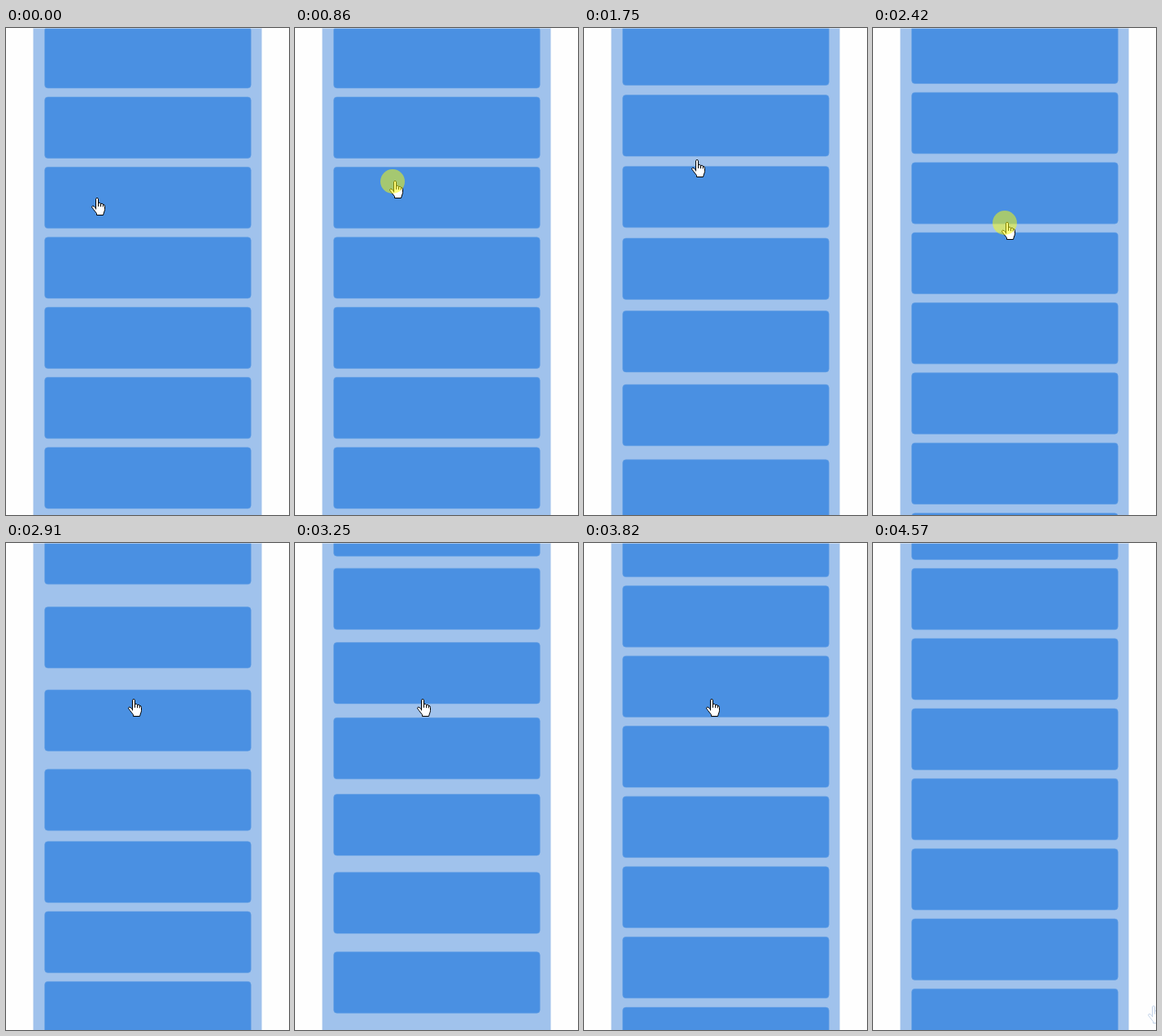
An HTML page that plays this animation: 348 by 600 pixels, repeating every 4.66 s.

```html
<!DOCTYPE html>
<html lang="en">
<head>
<meta charset="utf-8">
<title>Springy list</title>
<style>
  html, body { margin: 0; width: 100%; height: 100%; overflow: hidden; background: #fefefe; }
  svg { display: block; width: 348px; height: 600px; }
  .panel { fill: #a0c2ec; }
  .cell { fill: #4a90e2; stroke: #649fe5; stroke-width: .6; }
  .hand { fill: #fff; stroke: #000; stroke-linejoin: round; stroke-linecap: round; }
  .ghost { fill: #fff; stroke: #b3c7e2; stroke-width: .8; }
  .press { fill: #ff0; fill-opacity: .5; }
</style>
</head>
<body>
<svg viewBox="0 0 348 600">
  <defs>
    <path id="hand" d="M5.5 14V1.6Q5.5.5 7 .5T8.5 1.6V6.5Q10.6 5.4 11.5 7.5Q13.5 6.5 14.3 8.3Q16.5 8.4 16.5 10.5V14.5Q16.5 16 15.5 18L14.5 21.5H6.5V19.5L2.5 14.5Q.5 12 .5 11Q1.5 9.4 3.2 10.8L5.5 13M8.5 6.5V10.5M11.5 7.5V10.8M14.3 8.3V11"/>
  </defs>
  <rect class="panel" x="33.5" width="281" height="600"/>
  <g id="cells"></g>
  <rect x="33.5" width="281" height="1" fill="#fff" opacity=".5"/>
  <use id="ghost" class="ghost" href="#hand" x="338" y="570"/>
  <g id="cursor">
    <use class="hand" href="#hand"/>
    <circle id="press" class="press" cx="4" cy="1" r="15"/>
  </g>
</svg>
<script>
const LOOP = 4660, PITCH = 86.33, COUNT = 12, HOLD = 130;
const $ = id => document.getElementById(id);

const progress = (t, from, to) => Math.min(1, Math.max(0, (t - from) / (to - from)));
const easeInOut = u => u * u * (3 - 2 * u);
const easeOut = u => u * (2 - u);

// Critically damped step response
const spring = x => x <= 0 ? 0 : 1 - (1 + x) * Math.exp(-x);

// A flick runs down the list: each cell springs off `lag` ms after the one above
const flick = (t, i, { start, lag, stiffness, distance }) =>
  distance * spring(stiffness * ((t - start) / lag - i));

const first = { start: 996, lag: 58, stiffness: .47, distance: 92 };
const second = { start: 2706, lag: 36.5, stiffness: .33, distance: 140 };
const glide = t => 167 * easeOut(progress(t, 2535, 4530));

const cellY = (i, t) =>
  PITCH * i - 1.3 - flick(t, i, first) - flick(t, i, second) - glide(t);

const moves = [
  { from: 230, to: 520, x: 115, y: 226 },
  { from: 600, to: 1240, x: 118, y: 122, drag: true },
  { from: 1400, to: 2300, x: 158, y: 239 },
  { from: 2470, to: 2800, x: 150, y: 192, drag: true },
  { from: 3840, to: 4060, x: 352, y: 592 },
];

function cursorAt(t) {
  let x = 105, y = 209, pressed = false;
  for (const m of moves) {
    const u = easeInOut(progress(t, m.from, m.to));
    x += (m.x - x) * u;
    y += (m.y - y) * u;
    if (m.drag && t > m.from - HOLD && t < m.to) pressed = true;
  }
  return { x: Math.round(x), y: Math.round(y), pressed };
}

const cells = Array.from({ length: COUNT }, () => {
  const cell = document.createElementNS('http://www.w3.org/2000/svg', 'rect');
  const attrs = { class: 'cell', x: 47.6, width: 253.6, height: 75.4, rx: 4 };
  for (const name in attrs) cell.setAttribute(name, attrs[name]);
  return $('cells').appendChild(cell);
});

const start = performance.now();
function draw() {
  const t = (performance.now() - start) % LOOP;
  cells.forEach((cell, i) => cell.setAttribute('y', cellY(i, t).toFixed(2)));
  const { x, y, pressed } = cursorAt(t);
  $('cursor').setAttribute('transform', `translate(${x} ${y})`);
  $('press').style.display = pressed ? '' : 'none';
  $('ghost').style.display = t > 4050 ? '' : 'none';
  requestAnimationFrame(draw);
}
draw();
</script>
</body>
</html>
```
